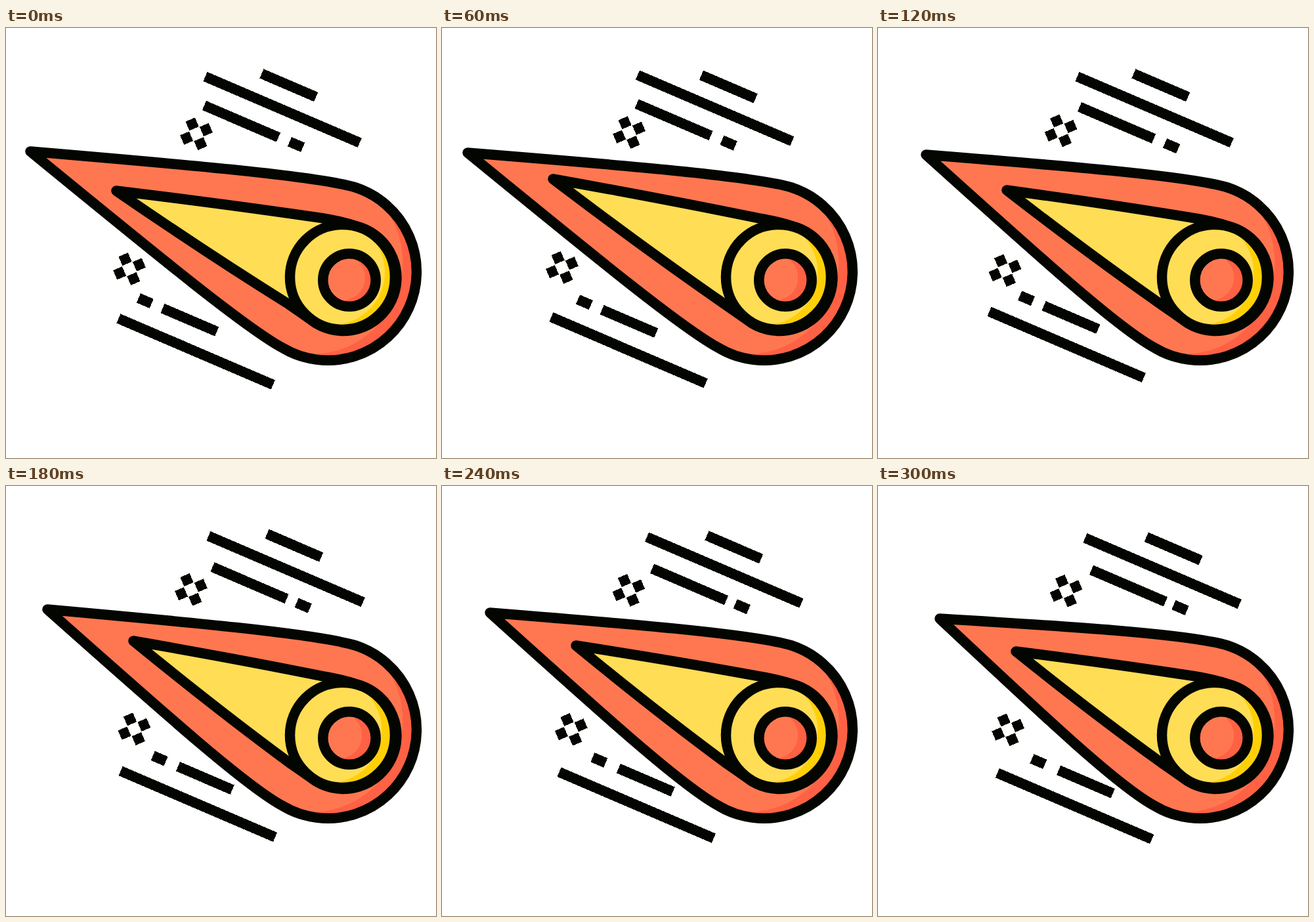
These frames come from a looping animation (655x655 px, 0.36 s). An HTML page:

```html
<!DOCTYPE html>
<html lang="en">
<head>
<meta charset="utf-8">
<title>Comet</title>
<style>
  html, body { margin: 0; width: 100%; height: 100%; overflow: hidden; background: #fff; }
  svg { display: block; width: 100vw; height: 100vh; }
  .ink { fill: none; stroke: #030501; stroke-width: 15.5; stroke-linejoin: round; }
  #marks { shape-rendering: crispEdges; }
  .orange { fill: #ff7750; }
  .red { fill: #ff6144; }
  .yellow { fill: #ffdd55; }
  .gold { fill: #ffd008; }
</style>
</head>
<body>
<svg viewBox="0 0 655 655">
  <defs>
    <path id="flame"/>
    <path id="tail"/>
    <clipPath id="flameClip"><use href="#flame"/></clipPath>
    <clipPath id="headClip"><circle cx="512.5" cy="379.5" r="78"/></clipPath>
    <clipPath id="coreClip"><circle cx="523" cy="384" r="38"/></clipPath>
  </defs>

  <path id="marks" class="ink"/>

  <use href="#flame" class="orange"/>
  <path class="red" clip-path="url(#flameClip)" d="M490 225H655V520H464V497A140 140 0 0 0 569 264Z"/>
  <use href="#flame" class="ink"/>

  <use href="#tail" class="yellow"/>
  <use href="#tail" class="ink"/>

  <g clip-path="url(#headClip)">
    <circle class="gold" cx="512.5" cy="379.5" r="80"/>
    <circle class="light yellow" cx="497" cy="372" r="80"/>
  </g>
  <circle class="ink" cx="512.5" cy="379.5" r="80"/>

  <g clip-path="url(#coreClip)">
    <circle class="red" cx="523" cy="384" r="40"/>
    <circle class="light orange" cx="512" cy="380" r="35"/>
  </g>
  <circle class="ink" cx="523" cy="384" r="40.2"/>
</svg>
<script>
const STEP = 60, STEPS = 6;
const TILT = 23.2 * Math.PI / 180;
const COS = Math.cos(TILT), SIN = Math.sin(TILT);

// Resting point, length, then slide: nudge at step 1, jump at step 2, end of the loop
const dashes = [
  [303.5, 74, 256, -6, 0, 13],
  [389.5, 69.5, 90, 6, 0, 21],
  [302, 118, 123, -6, 5.5, 25],
  [432, 173.2, 22, -6, 5.5, 20],
  [238.5, 427, 90, 5.5, 11.5, 36],
  [202, 411.3, 21.5, 5.5, 11.5, 31.5],
  [171.5, 442.5, 256, -5.5, -6, 7.5]
];
const sparkles = [
  [290, 161.3, -5.4, -12.4, -3.8],
  [188, 367, -5.5, 6, 11]
];

// Flickering points of the flame and of its inner tail
const flameTips = [[37, 188], [39, 190], [73, 193], [63, 188], [73, 193], [94, 202]];
const tailTips = [[168, 248], [169, 230], [196, 247], [194, 236], [204, 243], [210, 252]];

const toward = (from, to, k) => from.map((v, i) => v + (to[i] - v) * k);

function slide(i, nudge, jump, end) {
  if (i < 2) return i * nudge;
  return jump + (end - jump) * ((i - 2) / 3) ** 0.8;
}

function dash(i, [x, y, len, ...keys]) {
  const s = slide(i, ...keys);
  const lift = y > 300 && i > 1 ? 9 : 0; // the lower dashes also hop closer
  return `M${x + s * COS + lift * SIN} ${y + s * SIN - lift * COS}l${len * COS} ${len * SIN}`;
}

// Four squares around a centre, tilted against the dashes
function sparkle(i, [x, y, ...keys]) {
  const s = slide(i, ...keys);
  let d = "";
  for (let n = 0; n < 4; n++) {
    const a = n * Math.PI / 2 - TILT, c = Math.cos(a), sn = Math.sin(a);
    d += `M${x + s * COS + 8.7 * c} ${y + s * SIN + 8.7 * sn}l${15 * c} ${15 * sn}`;
  }
  return d;
}

function flamePath(tip) {
  const top = [474, 225], low = [368, 459];
  return `M${tip}C${toward(tip, top, .49)} ${top} 532.7 243` +
    `A135 135 0 1 1 422.2 487.7C${low} ${toward(tip, low, .61)} ${tip}Z`;
}

function tailPath(tip) {
  return `M${tip}Q${toward(tip, [482, 286], .55)} 482 289.7Q515 295 541 304.1` +
    `A81 81 0 1 1 472.6 450.1Q450 434 431 421Q${toward(tip, [425, 425], .55)} ${tip}Z`;
}

function draw(now) {
  const i = Math.floor(now / STEP) % STEPS;
  const setPath = (id, d) => document.getElementById(id).setAttribute("d", d);
  setPath("flame", flamePath(flameTips[i]));
  setPath("tail", tailPath(tailTips[i]));
  setPath("marks", dashes.map(m => dash(i, m)).join("") + sparkles.map(m => sparkle(i, m)).join(""));
  for (const light of document.querySelectorAll(".light"))
    light.setAttribute("transform", `translate(${i ? -4.7 : 0})`);
}

const start = performance.now();
function tick() {
  draw(performance.now() - start);
  requestAnimationFrame(tick);
}
tick();
</script>
</body>
</html>
```
